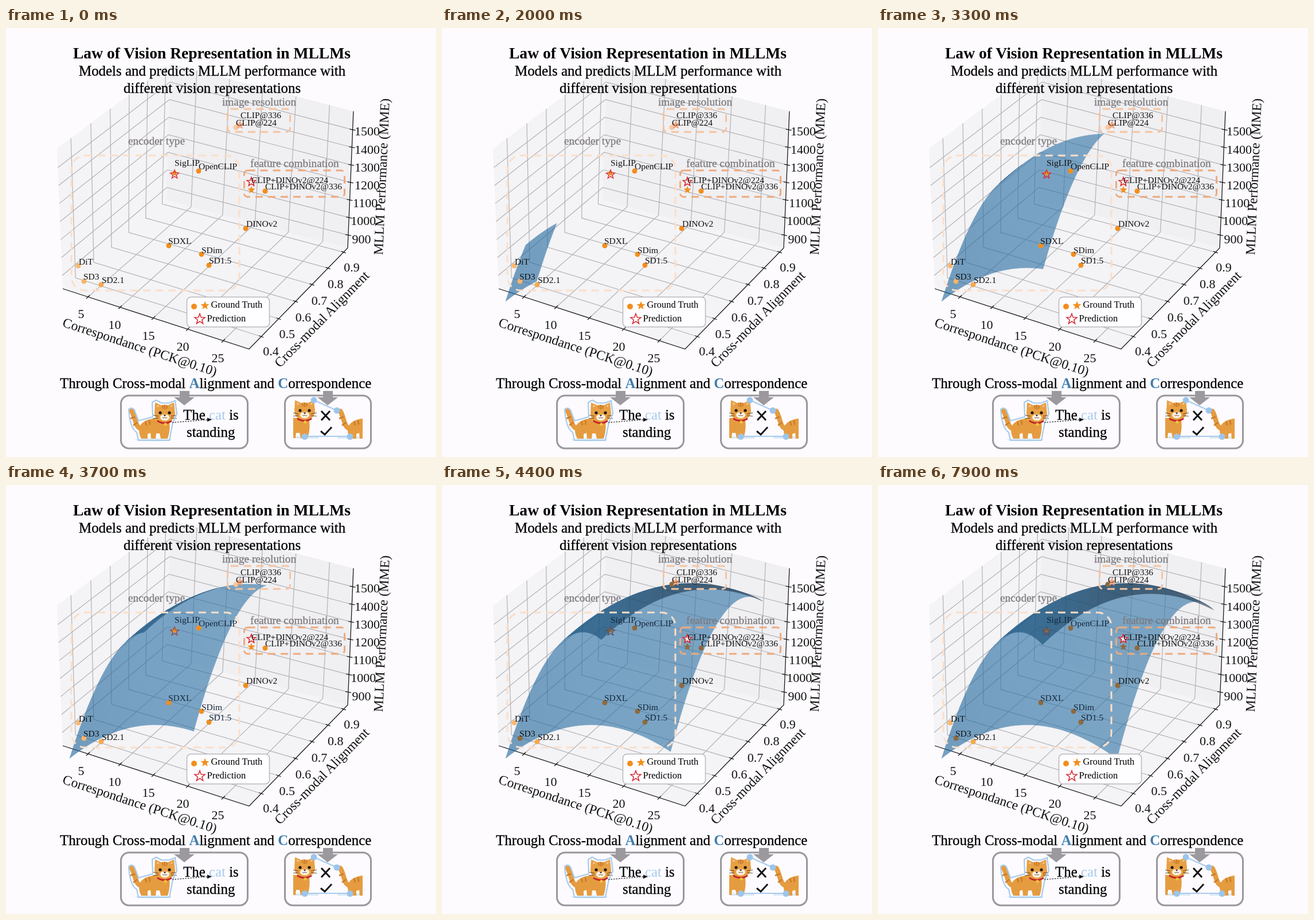
Animation of 750 by 747 pixels, one loop 8000 ms. Source, as an HTML page:

```html
<!DOCTYPE html>
<html lang="en">
<head>
<meta charset="utf-8">
<title>Law of Vision Representation</title>
<style>
html, body { margin: 0; width: 100%; height: 100%; overflow: hidden; background: #fdfbfe; }
svg { display: block; width: 100vw; height: 100vh; font-family: "Liberation Serif", "Times New Roman", serif; }
.grid { fill: none; stroke: #b2b1b4; stroke-width: 1.2; }
.axis { fill: none; stroke: #1a1a1a; stroke-width: 1.3; }
.frame { fill: none; stroke-dasharray: 13 9; stroke-width: 3; }
.card { fill: #fdfbff; stroke: #99979d; stroke-width: 3; }
.head { font-size: 24.9px; stroke: #000; stroke-width: .3; }
.head .b { font-weight: bold; fill: #3f7dae; stroke: none; }
.group { font-size: 19.3px; fill: #7d7a7f; stroke: #7d7a7f; stroke-width: .3; }
.tick { font-size: 22px; text-anchor: middle; fill: #111; }
.title { font-size: 23.4px; text-anchor: middle; fill: #111; }
.label { font-size: 15.5px; }
.link { fill: none; stroke: #a6cbee; stroke-width: 2.2; stroke-linejoin: round; }
</style>
</head>
<body>
<svg viewBox="0 0 750 747" preserveAspectRatio="none">
  <defs>
    <linearGradient id="front" gradientUnits="userSpaceOnUse" x1="120" y1="400" x2="430" y2="330">
      <stop offset="0" stop-color="#1c649a"/>
      <stop offset=".5" stop-color="#276ea4"/>
      <stop offset="1" stop-color="#2d72a4"/>
    </linearGradient>
    <linearGradient id="back" gradientUnits="userSpaceOnUse" x1="190" y1="0" x2="570" y2="0">
      <stop offset="0" stop-color="#14507d"/>
      <stop offset=".3" stop-color="#14486f"/>
      <stop offset=".65" stop-color="#182f44"/>
      <stop offset="1" stop-color="#26374c"/>
    </linearGradient>
    <clipPath id="leftHalf"><rect x="501" y="642" width="44" height="74"/></clipPath>
    <clipPath id="rightHalf"><rect x="575" y="642" width="47" height="74"/></clipPath>
    <g id="rear">
      <path d="M242 698C224 700 228 682 219 667" fill="none" stroke="#e59c40" stroke-width="8.500" stroke-linecap="round"/>
      <path d="M217 680l8-3M222 692l7-5" stroke="#c87b2b" stroke-width="2.5"/>
      <path d="M233 694Q239 682 258 680L284 680Q288 696 282 715L270 715L268 706L262 706L261 715L253 715L252 705L247 707L247 715L236 715Q230 704 233 694Z" fill="#e59c40"/>
      <path d="M243 685l2 7M250 683l1 8" stroke="#c87b2b" stroke-width="2.4" fill="none"/>
    </g>
    <g id="face">
      <path d="M259 671L260 652L271 657Q276 655 282 657L293 652L295 671Q294 686 277 686Q260 686 259 671Z" fill="#e8a044"/>
      <path d="M263 660l1-4 4 3zM290 660l0-4-4 3z" fill="#f6c9a0"/>
      <path d="M273 657l1 6M277 656v8M281 657l-1 6" stroke="#c87b2b" stroke-width="2"/>
      <ellipse cx="277" cy="678" rx="8" ry="5.5" fill="#fff3e2"/>
      <circle cx="269" cy="670" r="2.6" fill="#1b1410"/>
      <circle cx="285" cy="670" r="2.6" fill="#1b1410"/>
      <path d="M274.500 673.500h5l-2.500 3z" fill="#4a2316"/>
      <path d="M273 678q2 3 4 0q2 3 4 0M266 676l-10-2M266 679l-10 1M288 676l10-2M288 679l10 1" fill="none" stroke="#3a2a20" stroke-width=".8"/>
      <path d="M264 684Q277 692 289 684" fill="none" stroke="#c3252b" stroke-width="3"/>
      <circle cx="278" cy="690" r="2.600" fill="#f3c53c"/>
    </g>
  </defs>

  <rect width="750" height="747" fill="#fdfbfe"/>
  <g id="scene"></g>
  <path id="over" fill="url(#front)" stroke="url(#front)" stroke-width=".6" opacity=".6"/>
  <path id="under" fill="url(#back)" stroke="url(#back)" stroke-width=".6" opacity=".6"/>
  <g id="marks"></g>

  <rect class="frame" x="114" y="222" width="293" height="235" rx="24" stroke="#fbdfc9"/>
  <rect class="frame" x="386.500" y="141" width="109" height="40" rx="6" stroke="#f5c4a0"/>
  <rect class="frame" x="415.500" y="248" width="175" height="46" rx="6" stroke="#eeaa7c"/>
  <text class="group" x="213" y="203">encoder type</text>
  <text class="group" x="377" y="135">image resolution</text>
  <text class="group" x="426" y="242">feature combination</text>
  <g id="labels"></g>

  <text x="117" y="53" font-size="27.55" font-weight="bold">Law of Vision Representation in MLLMs</text>
  <text class="head" x="127" y="83">Models and predicts MLLM performance with</text>
  <text class="head" x="205" y="113">different vision representations</text>

  <rect x="315.500" y="468.500" width="144" height="52" rx="7" fill="#fefdff" stroke="#b9b7bc" stroke-width="1.500"/>
  <g id="key"></g>
  <text x="357.500" y="487" font-size="16.4">Ground Truth</text>
  <text x="350.500" y="511" font-size="16.5">Prediction</text>

  <text class="head" x="94" y="627">Through Cross-modal <tspan class="b">A</tspan>lignment and <tspan class="b">C</tspan>orrespondence</text>
  <rect class="card" x="200.500" y="640" width="221" height="92" rx="14"/>
  <rect class="card" x="486.500" y="640" width="150" height="92" rx="14"/>
  <g fill="#9b999e">
    <path id="arrow" d="M303 632h17v11h9l-18 14l-18-14h10z"/>
    <use href="#arrow" x="250"/>
  </g>

  <ellipse cx="257" cy="717" rx="32" ry="2.500" fill="#dce9f5"/>
  <use href="#rear"/><use href="#face"/>
  <path class="link" d="M214 664Q219 659 224 665L231 684L256 677L255 652L262 648L271 653L284 653L295 649L298 672L291 687L288 702L285 718L231 718L228 704Q216 697 214 664Z"/>
  <path d="M290 687L352 682" stroke="#222" stroke-width="1.200" stroke-dasharray="2.500 2"/>
  <text class="head" x="309" y="682">The <tspan fill="#a9cbea" stroke="none">cat</tspan> is</text>
  <text class="head" x="315" y="712">standing</text>
  <path d="M351 678.500L359 682L351 685.500Z" fill="#111"/>

  <path d="M503 713h42M578 713h42" stroke="#dce9f5" stroke-width="4"/>
  <g clip-path="url(#leftHalf)"><g transform="translate(244 -4)"><use href="#rear" y="3"/><use href="#face"/></g></g>
  <g clip-path="url(#rightHalf)"><use href="#rear" x="364"/></g>
  <path class="link" d="M537 648L577 666M521 711H600"/>
  <g fill="#9cc5ec">
    <circle cx="537" cy="648" r="5.500"/><circle cx="577" cy="666" r="5.500"/>
    <circle cx="521" cy="711.500" r="5.500"/><circle cx="600" cy="711.500" r="5.500"/>
  </g>
  <path d="M550 667L565 683M565 667L550 683M549 702L556 708L568 695" fill="none" stroke="#111" stroke-width="3"/>
</svg>
<script>
const NS = 'http://www.w3.org/2000/svg';
const byId = id => document.getElementById(id);
function add(parent, tag, attrs, text) {
  const el = document.createElementNS(NS, tag);
  for (const k in attrs) el.setAttribute(k, attrs[k]);
  if (text !== undefined) el.textContent = text;
  parent.appendChild(el);
  return el;
}
const line = pts => 'M' + pts.map(p => p[0].toFixed(2) + ' ' + p[1].toFixed(2)).join('L');

// Projective map of the unit square onto a quad given as p00, p10, p11, p01.
function squareTo([a, b, c, d]) {
  const sx = a[0] - b[0] + c[0] - d[0], sy = a[1] - b[1] + c[1] - d[1];
  const x1 = b[0] - c[0], y1 = b[1] - c[1], x2 = d[0] - c[0], y2 = d[1] - c[1];
  const det = x1 * y2 - x2 * y1;
  const g = (sx * y2 - x2 * sy) / det, h = (x1 * sy - sx * y1) / det;
  return (s, t) => [0, 1].map(i =>
    (a[i] + (b[i] - a[i] + g * b[i]) * s + (d[i] - a[i] + h * d[i]) * t) / (1 + g * s + h * t));
}
const floor = squareTo([[99, 454], [424, 559], [596, 383], [280, 300]]);
const roof = squareTo([[89, 210], [427, 303], [606, 145], [287, 62]]);
function box(s, t, h) {
  const p = floor(s, t), q = roof(s, t);
  return [p[0] + (q[0] - p[0]) * h, p[1] + (q[1] - p[1]) * h];
}

const scene = byId('scene');
function drawAxes() {
  const pane = (fill, ...pts) => add(scene, 'path', { d: line(pts.map(p => box(...p))) + 'Z', fill });
  pane('#f4f3f6', [0, 0, 0], [1, 0, 0], [1, 1, 0], [0, 1, 0]);
  pane('#f4f3f6', [0, 0, 0], [0, 0, 1], [0, 1, 1], [0, 1, 0]);
  pane('#f0eff2', [0, 1, 0], [0, 1, 1], [1, 1, 1], [1, 1, 0]);
  const path = (cls, ...pts) => add(scene, 'path', { class: cls, d: line(pts) });
  const grid = (...pts) => path('grid', ...pts.map(p => box(...p)));
  const tick = (p, dx, dy) => path('axis', [p[0] - dx, p[1] - dy], [p[0] + dx, p[1] + dy]);
  const number = (x, y, text) => add(scene, 'text', { class: 'tick', x, y: y + 7.5 }, text);

  for (let k = 0; k < 5; k++) {
    const s = .1466 + .1814 * k;
    grid([s, 0, 0], [s, 1, 0], [s, 1, 1]);
    tick(box(s, 0, 0), 3, -3);
    number(131 + 58 * k + .4 * k * k, 497 + 19.3 * k, 5 * (k + 1));
  }
  for (let k = 0; k < 6; k++) {
    const t = .115 + .168 * k;
    grid([1, t, 0], [0, t, 0], [0, t, 1]);
    tick(box(1, t, 0), 4, 1.5);
    number(462 + 28.2 * k, 562 - 29.2 * k, (.4 + k / 10).toFixed(1));
  }
  for (let k = 0; k < 7; k++) {
    const h = .094 + .1285 * k;
    grid([0, 0, h], [0, 1, h], [1, 1, h]);
    tick(box(1, 1, h), 5, 1);
    number(620 + 10 * Math.min(1, k / 3), 367 - 31.2 * k, 900 + 100 * k);
  }
  path('axis', box(0, 0, 0), box(1, 0, 0), box(1, 1, 0), box(1, 1, 1));

  const title = (x, y, turn, text) =>
    add(scene, 'text', { class: 'title', transform: `translate(${x} ${y}) rotate(${turn})`, y: 6 }, text);
  title(233, 557, 18, 'Correspondance (PCK@0.10)');
  title(552, 508, -45.5, 'Cross-modal Alignment');
  title(657, 259, -87.5, 'MLLM Performance (MME)');
}

function star(parent, x, y, r, attrs) {
  const pts = Array.from({ length: 10 }, (_, i) => {
    const a = i * Math.PI / 5, q = i % 2 ? r * .42 : r;
    return [x + q * Math.sin(a), y - q * Math.cos(a)];
  });
  return add(parent, 'path', { d: line(pts) + 'Z', ...attrs });
}

const ORANGE = '#f28e1c', RED = '#d8262e';
const marks = byId('marks'), dimmable = [], tinted = [];
// covered: the finished surface lies in front of the mark
const dot = (x, y, fill, covered) => {
  const el = add(marks, 'circle', { cx: x, cy: y, r: 4.5, fill });
  if (covered) dimmable.push([el, fill]);
};

function drawMarks() {
  [[336, 249], [452, 284], [418, 349], [284, 379], [341, 394], [354, 413]].forEach(p => dot(...p, ORANGE, true));
  dot(126, 414, '#f8b873');
  dot(136, 441, '#f8b469', true);
  dot(166, 447, '#f6a94f');
  dot(401, 173, '#fac79b', true);
  star(marks, 408, 169, 7, { fill: '#f6ab78', stroke: '#ef9a85' });
  dimmable.push([star(marks, 294, 253, 6.500, { fill: ORANGE }), ORANGE]);
  star(marks, 294, 255, 8, { id: 'guess', fill: 'none', stroke: RED, 'stroke-width': 1.3 });
  dimmable.push([star(marks, 428, 282, 7, { fill: ORANGE }), ORANGE]);
  star(marks, 428, 268, 8, { fill: '#fdf3f4', stroke: RED, 'stroke-width': 1.6 });

  const label = (text, x, y, covered) => {
    const el = add(byId('labels'), 'text', { class: 'label', x, y, fill: '#111' }, text);
    if (covered) tinted.push(el);
  };
  label('CLIP@336', 409, 157);
  label('CLIP@224', 401, 170);
  label('SigLIP', 294, 240, true);
  label('OpenCLIP', 336, 246, true);
  label('CLIP+DINOv2@224', 428, 270);
  label('CLIP+DINOv2@336', 452, 281);
  label('DINOv2', 419, 346);
  label('SDXL', 283, 376, true);
  label('SDim', 341, 392, true);
  label('SD1.5', 354, 410, true);
  label('DiT', 127, 412);
  label('SD3', 135, 438);
  label('SD2.1', 167, 444);

  const key = byId('key');
  add(key, 'circle', { cx: 328, cy: 485, r: 5, fill: ORANGE });
  star(key, 347, 483.5, 8, { fill: ORANGE });
  star(key, 338, 507, 9.5, { fill: '#fff', stroke: RED, 'stroke-width': 1.5 });
}

// Quadratic dome over (u, v), seen in perspective.
function dome(u, v) {
  const w = 1 - .08 * u + .07 * v;
  const y = 476 + u * (226 * u - 263.2) + v * (387 * v - 565.5) - 45 * u * v;
  return [(111 + 272.5 * u + 196.1 * v) / w, y / w];
}

const CELLS = 36;
function drawDome(size) {
  let over = '', under = '';
  const at = (i, j) => dome(size * i / CELLS, size * j / CELLS);
  for (let i = 0; size > 0 && i < CELLS; i++) {
    for (let j = 0; j < CELLS; j++) {
      const a = at(i, j), b = at(i + 1, j), c = at(i + 1, j + 1), d = at(i, j + 1);
      const turn = (c[0] - a[0]) * (d[1] - b[1]) - (c[1] - a[1]) * (d[0] - b[0]);
      const cell = line([a, b, c, d]) + 'Z';
      if (turn < 0) over += cell; else under += cell;
    }
  }
  byId('over').setAttribute('d', over);
  byId('under').setAttribute('d', under);
}

const LOOP = 8000, STEP = 100;
let shown = -1;
function render(ms) {
  const t = Math.floor(ms % LOOP / STEP) * STEP;
  if (t === shown) return;
  shown = t;
  drawDome(Math.min(1, Math.max(0, (t - 1400) / 3175)));
  for (const [el, fill] of dimmable) el.setAttribute('fill', t >= 4200 ? '#8d6a40' : fill);
  for (const el of tinted) el.setAttribute('fill', t >= 3600 ? '#14283b' : '#111');
  byId('guess').setAttribute('stroke', t >= 4200 ? '#5b4f5c' : t >= 3600 ? '#8a4a4e' : RED);
}

drawAxes();
drawMarks();
const start = performance.now();
(function loop() {
  render(performance.now() - start);
  requestAnimationFrame(loop);
})();
</script>
</body>
</html>
```
